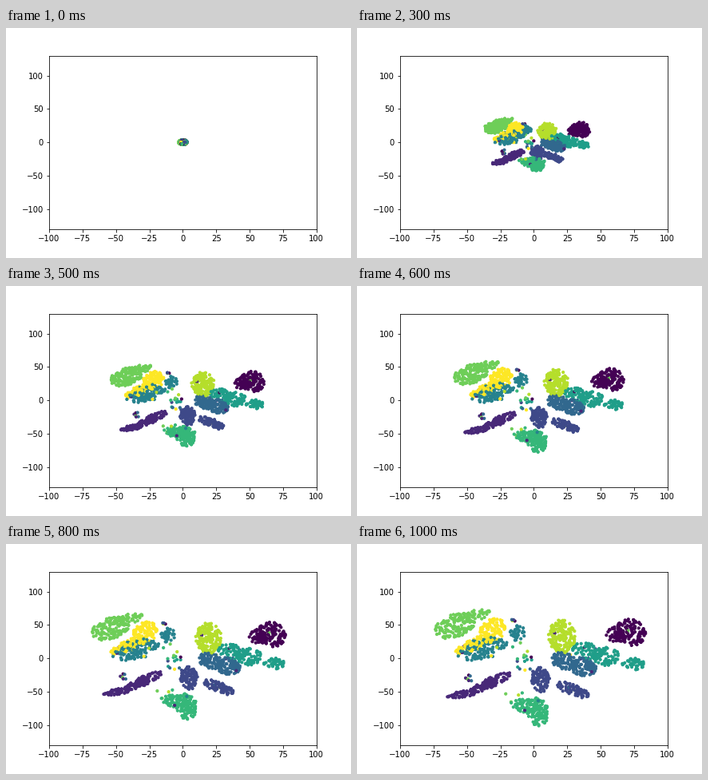
Write a matplotlib script that moves like this. It is 432x288 px and loops after 1100 ms.

```python
import numpy as np
import matplotlib.pyplot as plt
from matplotlib.animation import FuncAnimation

rng = np.random.default_rng(7)
PER_CLASS = 170

# One row per class; each blob: centre x, centre y, radius x, radius y, slope
CLASSES = [
    [(72, 39, 12, 20, -.1), (61, 36, 7, 11, 0)],
    [(-54, -54, 11, 5, .25), (-32, -36, 16, 8, .85)],
    [(5, -32, 7, 18, -.4), (29, -47, 12, 9, -.65)],
    [(23, -4, 10, 13, -.3), (37, -13, 10, 15, 0)],
    [(-39, 14, 19, 16, .4), (-12, 37, 6, 12, 0)],
    [(40, 11, 11, 12, -.3), (54, 3, 10, 14, 0), (75, -8, 9, 9, 0)],
    [(-6, -71, 11, 10, -.3), (3, -80, 8, 21, -.3)],
    [(-59, 49, 15, 18, .45), (-45, 63, 12, 9, .5)],
    [(21, 33, 10, 25, 0)],
    [(-31, 42, 10, 18, .5), (-45, 21, 14, 9, .9)],
]

# Loose points of any class: count, mean x, mean y, deviation x, deviation y
LOOSE = [(17, -7, -3, 5, 12), (7, -48, -34, 3, 7), (4, -17, 58, 3, 1),
         (5, -12, -50, 5, 9)]

# Growth exponents: centre y, spread x, spread y
EXPONENTS = {1: (.8, 1, .9), 6: (1.2, .4, 1), 8: (1, .6, 1)}
COMPACT = (1, .8, .9)

# Share of the final layout reached at each step
GROWTH = [0, .15, .32, .48, .62, .72, .8, .865, .917, .964, 1]


def disc(n):
    angle = rng.uniform(0, 2 * np.pi, n)
    radius = np.sqrt(rng.uniform(0, 1, n))
    return np.column_stack([np.cos(angle), np.sin(angle)]) * radius[:, None]


def build():
    parts = []

    def add(centre, spread, powers, label):
        n = len(spread)
        parts.append(np.column_stack([
            np.broadcast_to(centre, (n, 2)), spread,
            np.broadcast_to(powers, (n, 3)), np.broadcast_to(label, n)]))

    for label, blobs in enumerate(CLASSES):
        total = sum(rx * ry for _, _, rx, ry, _ in blobs)
        for cx, cy, rx, ry, slope in blobs:
            off = disc(round(PER_CLASS * rx * ry / total)) * (rx, ry)
            off[:, 1] += slope * off[:, 0]
            add((cx, cy), off, EXPONENTS.get(label, COMPACT), label)
    for n, x, y, dx, dy in LOOSE:
        add((x, y), rng.normal(0, (dx, dy), (n, 2)), (1, 1, 1),
            rng.integers(0, 10, n))

    points = rng.permutation(np.vstack(parts))
    # A few points sit in the wrong cluster
    odd = rng.choice(len(points), 20, replace=False)
    points[odd, -1] = rng.integers(0, 10, len(odd))
    return points[:, :2], points[:, 2:4], points[:, 4:7], points[:, 7]


centre, spread, power, label = build()
start = disc(len(label)) * (2.7, 3.4) + (.4, .3)
start[label == 7, 0] -= 1


def layout(i):
    s = GROWTH[i]
    scale = np.column_stack([np.full(len(label), s), s ** power[:, 0]])
    return centre * scale + spread * s ** power[:, 1:] + start * (1 - s)


fig, ax = plt.subplots(figsize=(6, 4), dpi=72)
fig.subplots_adjust(left=.125, right=.9, bottom=.125, top=.88)
ax.set(xlim=(-100, 100), ylim=(-130, 130))
dots = ax.scatter(*layout(0).T, s=10, c=label, cmap="viridis")


def update(i):
    dots.set_offsets(layout(i))
    return dots,


anim = FuncAnimation(fig, update, frames=len(GROWTH), interval=100,
                     repeat=True)
plt.show()
```
